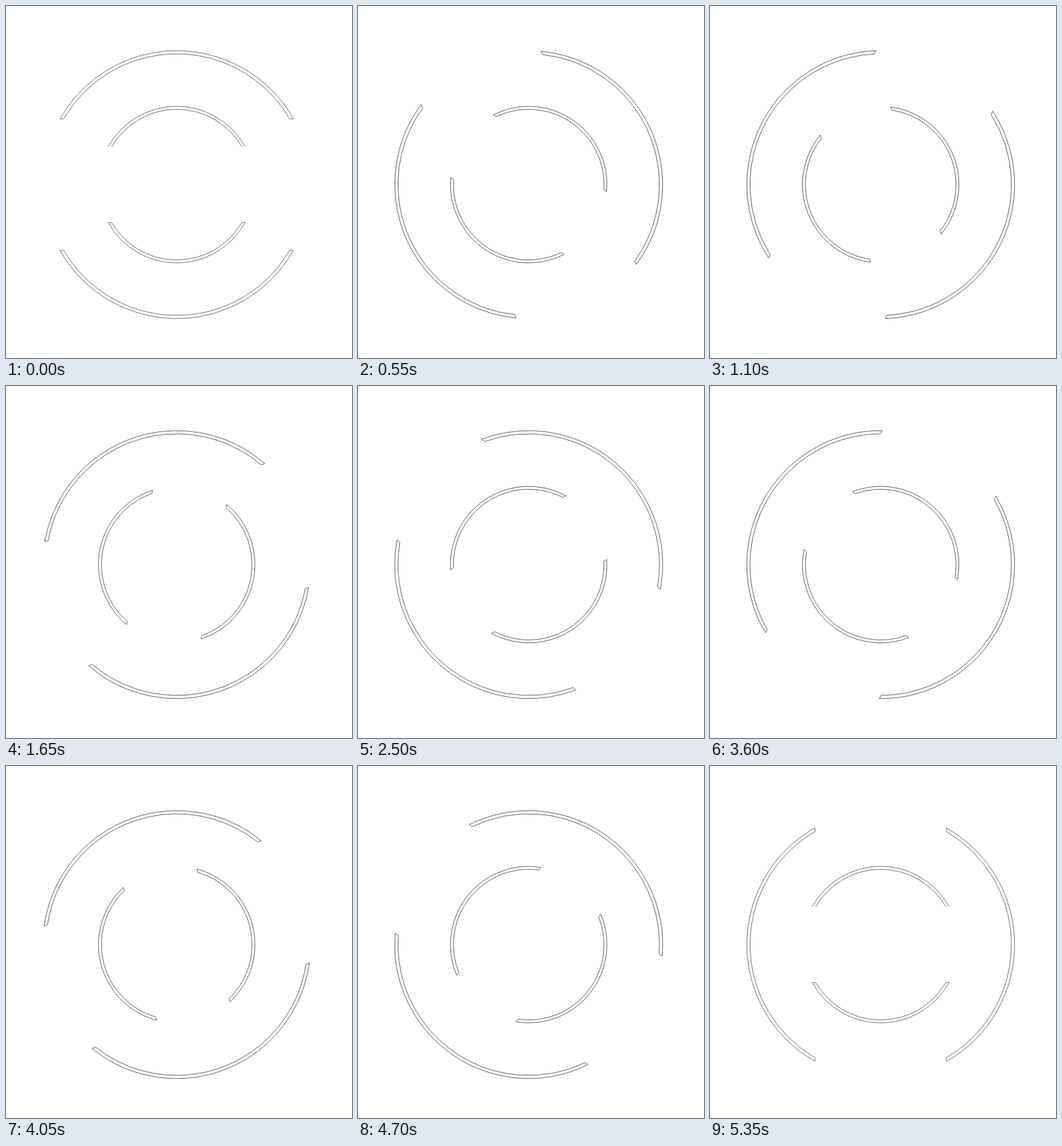
These frames come from a looping animation (528x537 px, 6.06 s). An HTML page with a canvas:

```html
<!DOCTYPE html>
<html lang="en">
<head>
<meta charset="utf-8">
<title>Rotating arcs</title>
<style>
  html, body { margin: 0; width: 100%; height: 100%; overflow: hidden; background: #fff; }
  canvas { display: block; }
</style>
</head>
<body>
<canvas id="stage" width="528" height="537"></canvas>
<script>
const LOOP = 6060, STEP = 50, LAST = 107;
const ctx = document.getElementById('stage').getContext('2d');

// keys: [step, clockwise degrees], linear in between
const rings = [
  { outer: 204.4, inner: 199.5, cut: 100.3,
    keys: [[0, 0], [15, 90], [38, 180], [65, 270], [107, 450]] },
  { outer: 119.4, inner: 114.9, cut: 57.8, openTop: true,
    keys: [[0, 0], [29, 90], [62, 180], [107, 360]] }
];

function angleAt(keys, step) {
  const i = Math.max(1, keys.findIndex(k => k[0] >= step));
  const [s0, a0] = keys[i - 1], [s1, a1] = keys[i];
  return a0 + (a1 - a0) * (step - s0) / (s1 - s0);
}

// A band between two radii, cut off by a straight chord
function drawBand({ outer, inner, cut }, capped) {
  const a = Math.asin(cut / outer), b = Math.asin(cut / inner);
  ctx.beginPath();
  ctx.arc(0, 0, outer, Math.PI + a, -a);
  if (!capped) ctx.moveTo(inner * Math.cos(b), -cut);
  ctx.arc(0, 0, inner, -b, Math.PI + b, true);
  if (capped) ctx.closePath();
  ctx.stroke();
}

function drawRing(ring, step) {
  const deg = angleAt(ring.keys, step);
  const level = deg % 180 === 0;
  for (const side of [0, 180]) {
    const turn = (deg + side) % 360;
    ctx.save();
    ctx.translate(260.5, 272.5);
    ctx.rotate(turn * Math.PI / 180);
    drawBand(ring, !(ring.openTop && level && turn === 0));
    ctx.restore();
  }
}

function render(time) {
  const step = Math.min(LAST, Math.floor(time % LOOP / STEP));
  ctx.fillStyle = '#fff';
  ctx.fillRect(0, 0, 528, 537);
  ctx.strokeStyle = '#444';
  ctx.lineWidth = 0.75;
  rings.forEach(ring => drawRing(ring, step));
}

const start = performance.now();
function tick() {
  render(performance.now() - start);
  requestAnimationFrame(tick);
}
tick();
</script>
</body>
</html>
```
